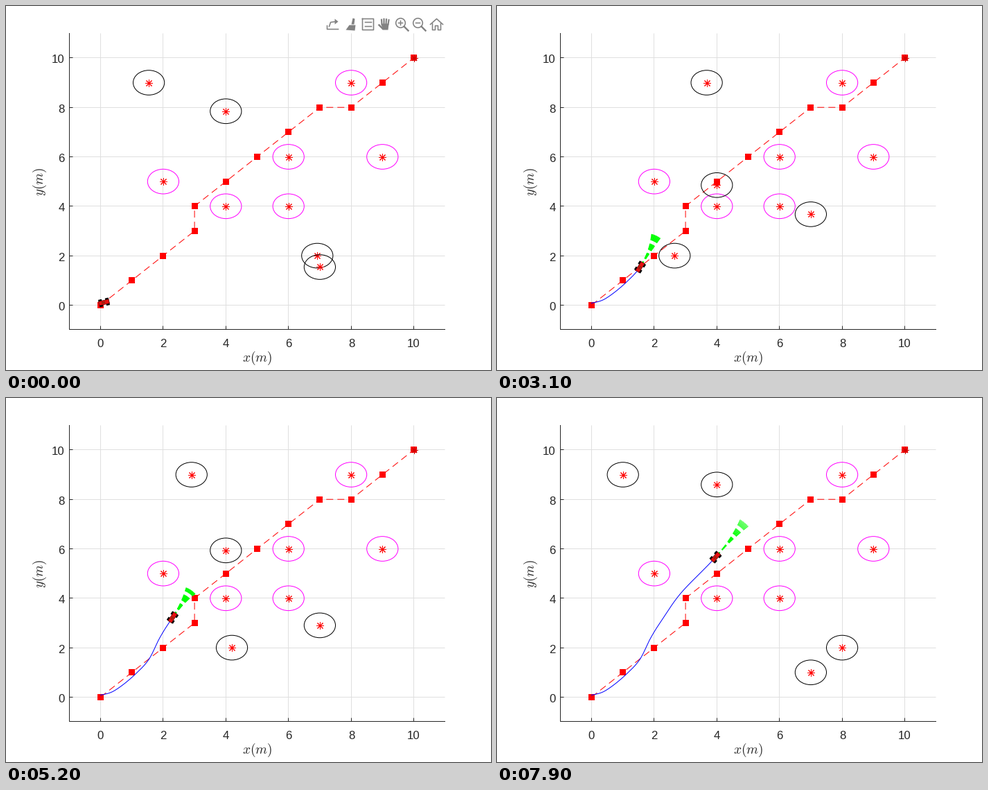
Animation, 700 px wide and 525 px high, one loop 8 s. Source, as a matplotlib script:

```python
import numpy as np
import matplotlib.pyplot as plt
from matplotlib.animation import FuncAnimation
from matplotlib.collections import LineCollection, PolyCollection
from matplotlib.patches import Circle, Ellipse, Rectangle

W, H, DPI = 700, 525, 100
FRAMES, STEP = 80, 100
PX = 72 / DPI  # points per pixel
X0, Y0, SX, SY = 136, 430.9, 45.2, 35.65
INK, RED, GRAY = "#262626", "#ff0000", "#828282"

plt.rcParams.update({
    "font.family": "Liberation Sans",
    "mathtext.fontset": "cm",
    "lines.scale_dashes": False,
})

# One data unit per pixel, integers on pixel centres
fig = plt.figure(figsize=(W / DPI, H / DPI), dpi=DPI, facecolor="white")
ax = fig.add_axes([0, 0, 1, 1])
ax.set_xlim(-0.5, W - 0.5)
ax.set_ylim(H - 0.5, -0.5)
ax.axis("off")


def to_px(x, y):
    return X0 + SX * np.asarray(x), Y0 - SY * np.asarray(y)


def line(xs, ys, color, width=1.0, **kw):
    return ax.plot(xs, ys, color=color, lw=width * PX, snap=False, **kw)[0]


def label(x, y, s, size, **kw):
    ax.text(x, y, s, fontsize=size * PX, color=INK, **kw)


# Axes, grid and labels
left, right, top, bottom = 91, 633, 39, 466
butt = {"solid_capstyle": "butt"}
for v in range(0, 11, 2):
    px, py = np.round(to_px(v, v))
    line([px, px], [bottom, top], "#dfdfdf", zorder=1, **butt)
    line([left, right], [py, py], "#dfdfdf", zorder=1, **butt)
    line([px, px], [bottom, bottom - 5], INK, zorder=2, **butt)
    line([left, left + 5], [py, py], INK, zorder=2, **butt)
    label(px, 485, str(v), 16.7, ha="center", va="center_baseline")
    label(84, py + 1.5, str(v), 16.7, ha="right", va="center_baseline")
line([left, left, right], [top, bottom, bottom], INK, zorder=2)
label(362.5, 507, "$x(m)$", 19.3, ha="center", va="center")
label(48, 253, "$y(m)$", 19.3, ha="center", va="center", rotation=90)

# Planned route: diagonal steps, one straight up, one straight right
steps = np.ones((11, 2))
steps[3, 0] = steps[8, 1] = 0
route = np.vstack([(0, 0), np.cumsum(steps, axis=0)])
rx, ry = to_px(*route.T)
line(rx, ry, RED, dashes=(10 * PX, 6 * PX), zorder=3)
for x, y in np.round(np.column_stack([rx, ry])):
    ax.add_patch(Rectangle((x - 4.5, y - 4.5), 9, 9, fc=RED, lw=0,
                           snap=False, zorder=4))
ax.plot(rx[-1:], ry[-1:], marker=(8, 2, 0), color="#d00000",
        ms=10 * PX, mew=PX, zorder=4)


class Obstacle:
    def __init__(self, x, y, color):
        self.ring = Ellipse((0, 0), SX, SY, fill=False, ec=color,
                            lw=PX, zorder=5)
        ax.add_patch(self.ring)
        self.star, = ax.plot([], [], marker=(8, 2, 0), color=RED,
                             ms=11 * PX, mew=PX, snap=False, zorder=5)
        self.move(x, y)

    def move(self, x, y):
        px, py = to_px(x, y)
        self.ring.center = px, py
        self.star.set_data([px], [py])


for x, y in [(2, 5), (4, 4), (6, 4), (6, 6), (9, 6), (8, 9)]:
    Obstacle(x, y, "#ff00ff")
movers = [Obstacle(0, 0, "black") for _ in range(4)]


def mover_places(i):
    """All four obstacles share one back-and-forth phase."""
    a = min(1.505 + 0.07 * max(i, 0.5), 1 + 0.0705 * (79 - i))
    d = a - 1
    return [(a, 9), (4, 8.6 - 1.4 * d), (8 - 2 * d, 2), (7, a)]


# Driven path: a few key points as time, x, y
keys = np.array([
    (-3, 136, 428), (0, 141, 427), (10, 157, 421), (22, 186, 398),
    (31, 206, 376), (39, 220, 348), (52, 240, 316), (64, 264, 282),
    (79, 315, 229), (93, 359, 176)])
kt, kp = keys[:, 0], keys[:, 1:]
slopes = np.gradient(kp, kt, axis=0)


def path(t):
    """Cubic Hermite curve through the key points."""
    t = np.atleast_1d(t)
    k = np.clip(np.searchsorted(kt, t, side="right") - 1, 0, len(kt) - 2)
    h = (kt[k + 1] - kt[k])[:, None]
    u = (t - kt[k])[:, None] / h
    return ((1 + 2 * u) * (1 - u) ** 2 * kp[k] + u * (1 - u) ** 2 * h * slopes[k]
            + u * u * (3 - 2 * u) * kp[k + 1] + u * u * (u - 1) * h * slopes[k + 1])


def travel(t0, t1):
    """Distance and direction between two times on the path."""
    (xa, ya), (xb, yb) = path([t0, t1])
    return np.hypot(xb - xa, yb - ya), np.arctan2(ya - yb, xb - xa)


def fan_arcs(i, face, reach):
    """Candidate arcs ahead of the car, bending towards its coming path."""
    aim = travel(i, i + 9)[1]
    bends = 2 * (aim - face) / reach + 15 / reach ** 2 * np.linspace(-1, 1, 9)
    s = np.linspace(0, reach, 16)
    arcs = []
    for bend in bends:
        a = face + bend * (s[1:] + s[:-1]) / 2
        moves = np.column_stack([np.cos(a), -np.sin(a)]) * s[1]
        arcs.append(path(i)[0] + np.vstack([(0, 0), np.cumsum(moves, axis=0)]))
    return arcs


def box(cx, cy, w, h):
    return np.array([(cx + sx * w / 2, cy + sy * h / 2)
                     for sx, sy in ((-1, -1), (1, -1), (1, 1), (-1, 1))])


car_parts = [box(x, y, 5, 2.8) for x in (-5, 5) for y in (-4, 4)]
car_parts += [box(0, 0, 15, 6), box(-1, 0, 5, 3)]

trail = line([], [], "#0000ff", zorder=6)
fan = LineCollection([], colors="#00ff00", zorder=7,
                     linestyles=[(0, (9 * PX, 5 * PX))])
car = PolyCollection([], facecolors=["black"] * 4 + ["#e81010", "#a02010"],
                     edgecolors=["none"] * 4 + ["#500000", "none"],
                     linewidths=0.7 * PX, zorder=8)
ax.add_collection(fan, autolim=False)
ax.add_collection(car, autolim=False)


def make_toolbar(cy=26):
    parts = []

    def stroke(cx, *pts, width=1.6):
        x, y = np.array(pts).T
        parts.append(line(cx + x, cy + y, GRAY, width, zorder=9))

    def fill(cx, *pts):
        x, y = np.array(pts).T
        parts.extend(ax.fill(cx + x, cy + y, color=GRAY, lw=0, zorder=9))

    # export
    stroke(471, (-8, 2), (-8, 7), (8, 7))
    stroke(471, (-5, 3), (-3, -3), (4, -4))
    fill(471, (3, -8), (8, -4), (3, 0))
    # brush
    fill(498, (2, -9), (5, -8), (4, 0), (0, 0))
    fill(498, (-3, 1), (6, 1), (5, 9), (-8, 8))
    # data tip
    stroke(522, *box(0, 0, 16, 16), (-8, -8))
    for y in (-3, 3):
        stroke(522, (-4, y), (5, y))
    # hand: palm, thumb and four fingers
    fill(546, (-5, -1), (6, -1), (5, 8), (-3, 8))
    stroke(546, (-8, 1), (-3, 6), width=2.5)
    for k in range(4):
        x = -4 + 3 * k
        stroke(546, (x, 0), (x + 0.5 * (k - 1), -8 + abs(k - 1.3)), width=2.2)
    # zoom in, zoom out
    for cx in (571, 596):
        ring = Circle((cx - 2, cy - 2), 6.8, fill=False, ec=GRAY,
                      lw=1.6 * PX, zorder=9)
        parts.append(ax.add_patch(ring))
        stroke(cx, (3, 3), (9, 9), width=2.4)
        stroke(cx, (-5, -2), (1, -2))
    stroke(571, (-2, -5), (-2, 1))
    # home
    stroke(621, (-9, 0), (0, -8), (9, 0))
    stroke(621, (-6, -1), (-6, 8), (-2, 8), (-2, 2), (2, 2), (2, 8),
           (6, 8), (6, -1))
    return parts


toolbar = make_toolbar()


def update(i):
    for part in toolbar:
        part.set_visible(i == 0)
    for mover, place in zip(movers, mover_places(i)):
        mover.move(*place)

    trail.set_data(*path(np.linspace(-3, i, 4 * i + 8)).T)

    # The fan reaches further the faster the car drives
    speed, face = travel(i - 0.5, i + 0.5)
    reach = min(15 * speed, 66)
    fan.set_segments(fan_arcs(i, face, reach) if i else [])
    fan.set_linewidth(np.interp(reach, [50, 66], [2, 1]) * PX)

    turn = np.array([(np.cos(face), -np.sin(face)),
                     (np.sin(face), np.cos(face))])
    car.set_verts([path(i)[0] + p @ turn for p in car_parts])
    return []


anim = FuncAnimation(fig, update, frames=FRAMES, interval=STEP,
                     init_func=lambda: update(0), repeat=True,
                     repeat_delay=0, blit=False)
plt.show()
```
